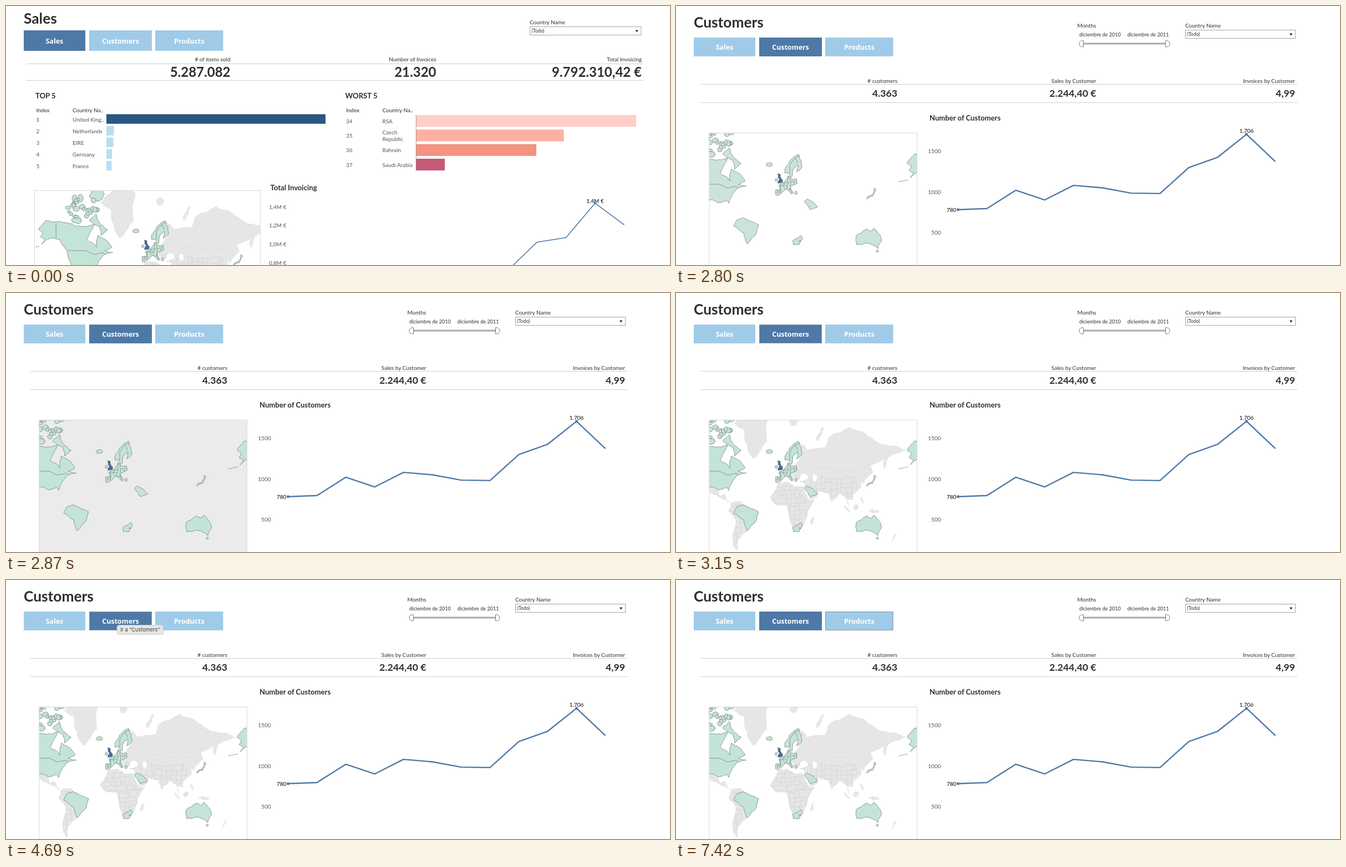
An HTML page that plays this animation: 1197x468 px, repeating every 8000 ms.

```html
<!DOCTYPE html>
<html lang="en">
<head>
<meta charset="utf-8">
<title>Dashboard</title>
<style>
html, body { margin: 0; width: 100%; height: 100%; overflow: hidden; background: #fff; }
svg { display: block; width: 100%; height: 100%; font-family: Lato, sans-serif; }
.btn { font: 700 12.4px "Open Sans", sans-serif; }
.tip { font: 9.2px Inter, sans-serif; }
</style>
</head>
<body>
<svg id="stage" viewBox="0 0 1197 468" xmlns="http://www.w3.org/2000/svg"></svg>
<script>
const NS = 'http://www.w3.org/2000/svg';
const LOOP = 8000;
const BLUE = '#4e79a7', LIGHT = '#a0cbe8', INK = '#2e2e2e', SOFT = '#555';
const stage = document.getElementById('stage');

function el(parent, tag, attrs = {}, text) {
  const n = document.createElementNS(NS, tag);
  for (const k in attrs) n.setAttribute(k, attrs[k]);
  if (text !== undefined) n.textContent = text;
  parent.appendChild(n);
  return n;
}
const rect = (p, x, y, width, height, fill, more) => el(p, 'rect', { x, y, width, height, fill, ...more });
const label = (p, x, y, size, text, more) => el(p, 'text', { x, y, 'font-size': size, fill: INK, ...more }, text);
const END = { 'text-anchor': 'end' }, MID = { 'text-anchor': 'middle' }, BOLD = { 'font-weight': 700 };
const rule = (p, x1, x2, y) => el(p, 'path', { d: `M${x1} ${y}H${x2}`, stroke: '#cfcfcf' });
const show = (n, on) => n.setAttribute('visibility', on ? 'inherit' : 'hidden');

let seed = 11;
function rand() {
  seed = (seed * 16807) % 2147483647;
  return seed / 2147483647;
}
const spread = size => (rand() - .5) * size;

// Mercator world map: key points joined by seeded rough coastlines
const WORLD = 424, R = WORLD / (2 * Math.PI);
const project = ([lon, lat]) => [
  190.3 + lon * WORLD / 360,
  388.4 - R * Math.log(Math.tan(Math.PI / 4 + lat * Math.PI / 360))
];
function roughen(a, b, k) {
  const dx = b[0] - a[0], dy = b[1] - a[1];
  if (Math.hypot(dx, dy) < 3.5) return [b];
  const s = spread(k), mid = [(a[0] + b[0]) / 2 - dy * s, (a[1] + b[1]) / 2 + dx * s];
  return [...roughen(a, mid, k), ...roughen(mid, b, k)];
}
function outline(points, k, closed) {
  const px = points.map(project), all = [px[0]];
  const ring = closed ? [...px, px[0]] : px;
  for (let i = 1; i < ring.length; i++) all.push(...roughen(ring[i - 1], ring[i], k));
  return 'M' + all.map(p => p.map(v => v.toFixed(1)).join(' ')).join('L') + (closed ? 'Z' : '');
}
const pairs = s => s.split(', ').map(p => p.split(' ').map(Number));
const land = (layer, shape, k = .28) => el(layer, 'path', { d: outline(pairs(shape), k, true) });
const border = (layer, line, k = .2) => el(layer, 'path', { d: outline(pairs(line), k), fill: 'none' });
function island(layer, lon, lat, rx, ry, lean = 0) {
  const ring = Array.from({ length: 8 }, (_, i) => {
    const a = i * Math.PI / 4, v = Math.sin(a);
    return [lon + rx * Math.cos(a) + lean * v, lat + ry * v];
  });
  el(layer, 'path', { d: outline(ring, .5, true) });
}

const defs = el(stage, 'defs');
const base = el(defs, 'g', { id: 'base', fill: '#e6e6e6', stroke: '#dcdcdc', 'stroke-width': .4 });
const marked = el(defs, 'g', { id: 'marked', stroke: '#69716f', 'stroke-width': .7, 'stroke-linejoin': 'round' });

// Wobbly lattice of country borders kept inside one land shape
function countries(layer, shape, id, [west, east], [south, north], step, stroke) {
  el(el(defs, 'clipPath', { id }), 'path', { d: shape.getAttribute('d') });
  const g = el(layer, 'g', { fill: 'none', stroke, 'stroke-width': .6, 'clip-path': `url(#${id})` });
  const node = {};
  for (let x = west; x <= east; x += step)
    for (let y = south; y <= north; y += step * .8) {
      const p = node[[x, y]] = [x + spread(step * .7), y + spread(step * .6)];
      for (const q of [node[[x - step, y]], node[[x, y - step * .8]]])
        if (q && rand() < .85) el(g, 'path', { d: outline([q, p], .25) });
    }
}

const GREY = '#c9c9c9';
const eurasia = land(base, '28 70, 40 66, 68 68, 73 73, 104 77, 140 72, 190 66, 163 61, 157 51, 156 60, 136 54, 140 48, 128 40, 126 35, 121 39, 122 30, 109 20, 109 12, 101 13, 103 1, 98 16, 90 22, 80 14, 77 8, 72 21, 57 25, 48 30, 56 25, 54 17, 44 13, 35 30, 36 36, 27 37, 41 41, 38 46, 30 46, 28 41, 23 38, 14 45, 22 56, 30 61', .2);
countries(base, eurasia, 'inAsia', [20, 120], [10, 48], 8, GREY);
border(base, '47 49, 60 52, 86 49, 120 50, 130 43').setAttribute('stroke', GREY);
const africa = land(base, '-6 36, 10 37, 20 31, 33 31, 43 11, 51 12, 40 -5, 35 -24, 26 -34, 18 -34, 12 -17, 9 3, -9 5, -17 15', .16);
countries(base, africa, 'inAfrica', [-16, 50], [-28, 34], 7.5, GREY);
land(base, '-117 32, -106 31, -97 27, -95 18, -88 21, -84 11, -78 8, -95 16, -106 21');
const south = land(base, '-77 8, -62 10, -50 0, -35 -6, -40 -20, -54 -34, -65 -42, -68 -55, -74 -50, -70 -18, -81 -5', .15);
countries(base, south, 'inSouth', [-80, -55], [-50, 10], 9, GREY);
land(base, '-73 78, -45 83, -20 81, -22 71, -43 60, -52 66, -57 76', .2);
el(base, 'path', { d: outline(pairs('48 46, 53 45, 53 37, 49 38'), .3, true), fill: '#fff' });
// Madagascar and Svalbard, then the Pacific arc
island(base, 47, -19, 2, 6, 1.5);
island(base, 18, 78.5, 6, 1.2);
island(base, 59, 74, 3, 3, 5);
island(base, 100, -1, 1.5, 5, -4);
island(base, 114, 1, 4, 4, 1);
island(base, 141, -5, 8, 2, -4);
island(base, 123, 12, 1.5, 5, -2);
island(base, 172, -41, 1, 5, 3);

const north = land(marked, '-124 48, -135 59, -150 60, -163 55, -158 59, -165 61, -161 64, -168 66, -157 71, -125 70, -95 68, -82 69, -94 59, -82 55, -79 52, -77 62, -66 59, -56 52, -66 49, -54 47, -67 45, -75 38, -81 26, -84 30, -97 27, -106 31, -117 32', .2);
border(marked, '-141 60, -141 69.6', 0);
border(marked, '-123 49, -95 49, -83 45, -69 47, -67 45', 0);
land(marked, '-90 71, -80 74, -62 66, -72 62, -75 68');
island(marked, -109, 71, 8, 1.6);
island(marked, -78, 80.5, 11, 1.8);
for (let i = 0; i < 26; i++) island(marked, -97 + spread(52), 76 + spread(7), 2 + rand() * 3, .4 + rand() * .7);
for (let i = 0; i < 5; i++) island(marked, -168 - i * 3, 53 - i * .4, .8, .2);

land(marked, '5 59, 5 62, 14 68, 26 71, 31 63, 23 60, 25 65, 17 61, 16 56, 13 55.5, 11 59', .2);
border(marked, '12 59, 13 65, 21 69, 28 70');
border(marked, '21 69, 24 66');
const europe = land(marked, '-9 43, -1 43.5, -4 48, 8 54, 10 57, 14 54, 23 54, 24 50, 13 46, 18 40, 16 38, 8 44, 0 39, -6 36, -9 37', .18);
countries(marked, europe, 'inEurope', [-6, 24], [39, 55], 5, '#69716f');
island(marked, 22, 39.5, 2, 2);
island(marked, -8, 53.2, 2, 1.4);
island(marked, -18.7, 65, 5, 1.3);

land(marked, '-60 5, -50 1, -35 -6, -40 -21, -53 -33, -58 -18, -73 -8, -69 1', .18);
land(marked, '17 -29, 18 -34, 27 -34, 32 -27, 30 -22, 20 -27', .18);
island(marked, 28, -29.6, 1.2, 1);
land(marked, '35 29, 39 32, 48 28, 55 21, 44 17', .12);
land(marked, '130 32, 132 35, 139 38, 142 45, 145 43, 141 38, 139 35');
land(marked, '114 -22, 130 -12, 137 -16, 142 -11, 153 -28, 147 -39, 131 -32, 115 -34', .18);
island(marked, 146.5, -42, 1.6, 1.2);
const home = el(marked, 'g', { fill: '#4a6c98', stroke: '#41566f' });
land(home, '-5.5 50, 1.5 51, 1.5 53, -2 56, -2 58, -6 58.5, -5 55, -3 54, -5 52', .15);

function worldMap(p, id, x, y, w, dx, dy) {
  rect(el(defs, 'clipPath', { id }), x, y, w, 300);
  const back = rect(p, x, y, w, 300, '#fff');
  const g = el(el(p, 'g', { 'clip-path': `url(#${id})` }), 'g', { transform: `translate(${dx} ${dy})` });
  const grey = el(g, 'use', { href: '#base' });
  const tint = el(g, 'g', { fill: '#c4e4d8' });
  for (const shift of [0, WORLD]) el(tint, 'use', { href: '#marked', x: shift });
  rect(p, x + .5, y + .5, w - 1, 300, 'none', { stroke: '#d9d9d9' });
  return { back, grey, tint };
}

// Shared page parts
const TABS = [['Sales', 32, 111], ['Customers', 150, 113], ['Products', 269, 122.5]];
const tabs = (p, y, h, active) => TABS.map(([name, x, w], i) => {
  rect(p, x, y, w, h, i === active ? BLUE : LIGHT);
  const edge = rect(p, x + .5, y + .5, w - 1, h - 1, 'none', { stroke: '#8294a5' });
  label(p, x + w / 2, y + h / 2 + 5, 12.4, name, { fill: '#fff', class: 'btn', ...MID });
  return edge;
});
function picker(p, x, y, w) {
  label(p, x - 1, y - 4.5, 10, 'Country Name');
  rect(p, x - .5, y + .5, w, 15, '#fff', { stroke: '#a3a3a3' });
  label(p, x + 2.5, y + 11, 8.6, '(Todo)');
  el(p, 'path', { d: `M${x + w - 11} ${y + 6.5}h5.4l-2.7 4z`, fill: '#222' });
}
function figure(p, x, y, name, gap, size, value) {
  label(p, x, y, 10, name, END);
  label(p, x, y + gap, size, value, { ...END, ...BOLD });
}
const title = (p, y, text) => label(p, 32, y, 26.3, text, BOLD);
const heading = (p, x, y, text) => label(p, x, y, 13.1, text, BOLD);
const dot = (p, cx, cy, r) => el(p, 'circle', { cx, cy, r, fill: BLUE });
function chart(p, values, x0, step, yOf, width) {
  const points = values.map((v, i) => `${x0 + i * step},${yOf(v)}`).join(' ');
  el(p, 'polyline', { points, fill: 'none', stroke: BLUE, 'stroke-width': width, 'stroke-linejoin': 'round' });
}

// Sales page
const sales = el(stage, 'g');
title(sales, 32, 'Sales');
const salesEdges = tabs(sales, 44, 37, 0);
picker(sales, 945, 37, 200.5);
rule(sales, 37, 1149, 104.5);
rule(sales, 37, 1149, 134.5);
figure(sales, 404.5, 100.3, '# of items sold', 27.7, 24, '5.287.082');
figure(sales, 775.5, 100.3, 'Number of Invoices', 27.7, 24, '21.320');
figure(sales, 1146, 100.3, 'Total Invoicing', 27.7, 24, '9.792.310,42 €');

function ranking(x, y, name) {
  heading(sales, x, y, name);
  label(sales, x + 1.5, y + 25, 10, 'Index');
  label(sales, x + 67, y + 25, 10, 'Country Na..');
}
const cell = (x, y, text) => label(sales, x, y, 10, text, { fill: SOFT });
ranking(53, 166.5, 'TOP 5');
[['United King..', 395], ['Netherlands', 13.5], ['EIRE', 12.5], ['Germany', 10], ['France', 9.5]].forEach(([name, w], i) => {
  const y = 204.5 + i * 21.1;
  cell(54.5, y + 4.2, i + 1);
  cell(120, y + 4.2, name);
  rect(sales, 181, y - 9, w, 17.3, i ? '#b9ddf1' : '#2a5783');
});
ranking(611.5, 167, 'WORST 5');
[['RSA', 397, '#ffcec6'], ['Czech Republic', 266.5, '#fdb1a3'], ['Bahrain', 217, '#f59282'], ['Saudi Arabia', 52, '#c55a77']].forEach(([name, w, fill], i) => {
  const y = 207.8 + i * 26.3;
  const rows = name.length > 12 ? name.split(' ') : [name];
  cell(613, y + 4, 34 + i);
  rows.forEach((s, k) => cell(678.5, y + 4 + (k - (rows.length - 1) / 2) * 12, s));
  rect(sales, 739, y - 10.8, w, 21.3, fill);
});
el(sales, 'path', { d: 'M739.3 197V297.5', stroke: '#8d8585', 'stroke-width': .7 });

worldMap(sales, 'clipA', 51, 333, 408, 66, 120);
heading(sales, 476.5, 333.3, 'Total Invoicing');
const moneyY = m => 363 - (m - 1.4) * 168;
for (let i = 0; i < 4; i++) {
  const m = 1.4 - i * .2;
  label(sales, 505.5, moneyY(m) + 3.7, 10, m.toFixed(1).replace('.', ',') + 'M €', { fill: SOFT, ...END });
}
chart(sales, [.717, 1.02, 1.07, 1.44, 1.207], 904.5, 52.5, moneyY, 1.5);
dot(sales, 1062, moneyY(1.44), 2);
label(sales, 1062, 355.5, 10, '1,4M €', { fill: '#000', ...MID });

// Customers page
const cust = el(stage, 'g');
title(cust, 38.8, 'Customers');
const custEdges = tabs(cust, 57, 34, 1);
picker(cust, 919, 43, 198);
label(cust, 723.5, 39.3, 10, 'Months');
label(cust, 727, 55, 9.1, 'diciembre de 2010');
label(cust, 888.5, 55, 9.1, 'diciembre de 2011', END);
rect(cust, 734, 66.5, 149, 3, '#aaa');
for (const [x, side] of [[734.5, -1], [882.5, 1]])
  el(cust, 'path', { d: `M${x} 62.7v11h${side * 3}q${side * 4.5}-1 ${side * 4.5}-5.5t${-side * 4.5}-5.5z`, fill: '#fff', stroke: '#777' });
rule(cust, 44, 1120, 141.5);
rule(cust, 44, 1120, 174.5);
figure(cust, 399, 139, '# customers', 25, 17.7, '4.363');
figure(cust, 757.5, 139, 'Sales by Customer', 25, 17.7, '2.244,40 €');
figure(cust, 1116, 139, 'Invoices by Customer', 25, 17.7, '4,99');
heading(cust, 457, 206.5, 'Number of Customers');
const map = worldMap(cust, 'clipB', 59.5, 229, 375.5, 0, 0);
const countY = n => 482.6 - n * .147;
for (const n of [500, 1000, 1500]) label(cust, 477.5, countY(n) + 4, 10, n, { fill: SOFT, ...END });
chart(cust, [780, 793, 1018, 899, 1078, 1048, 983, 978, 1297, 1424, 1706, 1371], 508.5, 52, countY, 2.4);
dot(cust, 508.5, countY(780), 2.5);
dot(cust, 1028.5, countY(1706), 2.5);
label(cust, 505.3, 372, 10, '780', { fill: '#000', ...END });
label(cust, 1028.5, 229.3, 10, '1.706', { fill: '#000', ...MID });

function tooltip(x, y, w, text) {
  const g = el(cust, 'g');
  rect(g, x - 1, y, w + 2, 18, '#000', { rx: 5, opacity: .09 });
  rect(g, x, y, w, 16.5, '#e7e6e5', { rx: 4, stroke: '#cbcac9', 'stroke-width': .7 });
  label(g, x + w / 2, y + 11.6, 9.2, text, { fill: '#3d3d3d', class: 'tip', ...MID });
  return g;
}
const tipCust = tooltip(200, 81.5, 83.5, 'Ir a “Customers”');
const tipProd = tooltip(338, 85, 74.5, 'Ir a “Products”');

function draw(t) {
  const between = (a, b) => t >= a && t < b;
  show(sales, t < 2800);
  show(cust, t >= 2800);
  salesEdges.forEach((e, i) => show(e, i === 1 && t >= 1190));
  custEdges.forEach((e, i) => show(e, i === 1 ? between(3010, 5390) : i === 2 && t >= 5460));
  show(tipCust, between(4690, 5390));
  show(tipProd, between(5740, 7420));
  if (t < 2800) salesEdges[0].setAttribute('visibility', 'hidden');

  // Map tiles fade in over three steps
  const loaded = t < 3010 ? 0 : Math.min(3, 1 + Math.floor((t - 3010) / 70)) / 3;
  const tone = Math.round(235 + 20 * (t < 2870 ? 1 : loaded));
  map.back.setAttribute('fill', `rgb(${tone},${tone},${tone})`);
  map.grey.setAttribute('opacity', loaded);
  map.tint.setAttribute('fill', t < 2870 ? '#cce3dc' : '#c4e4d8');
}

const start = performance.now();
function tick() {
  draw((performance.now() - start) % LOOP);
  requestAnimationFrame(tick);
}
tick();
</script>
</body>
</html>
```
